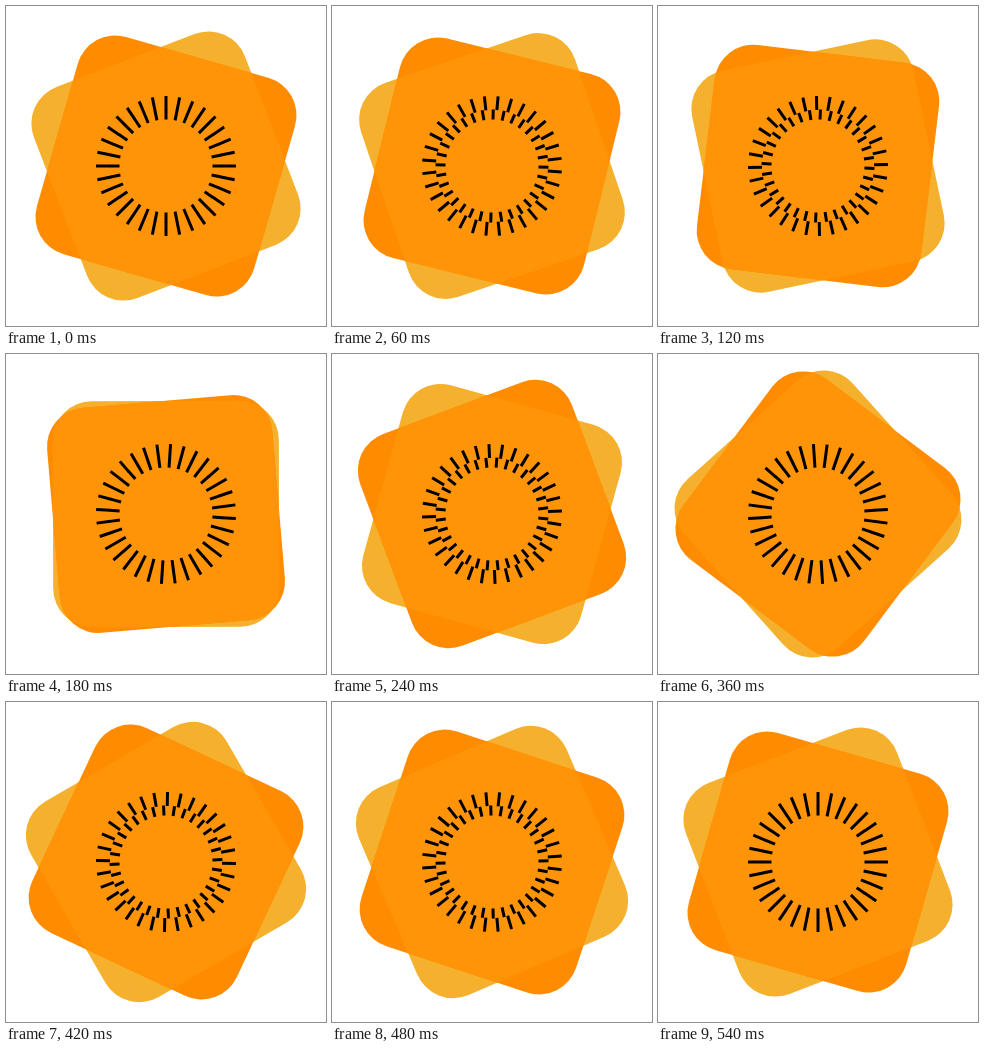
An HTML page with a canvas for the animation above (570 ms loop, 320 by 320 pixels).

```html
<!DOCTYPE html>
<html lang="en">
<head>
<meta charset="utf-8">
<title>Spinning badge</title>
<style>
  html, body { margin: 0; width: 100%; height: 100%; overflow: hidden; background: #fff; }
  canvas { display: block; width: 100vmin; height: 100vmin; }
</style>
</head>
<body>
<canvas id="stage" width="320" height="320"></canvas>
<script>
const ctx = document.getElementById('stage').getContext('2d');
const CENTER = 160, STEP = 30, STEPS = 19;
const HALF = 113, CORNER = 39;
const TICKS = 32;
const radians = degrees => degrees * Math.PI / 180;

// Symmetric cubic ease with control points (.42, 0) and (.58, 1).
function easeInOut(x) {
  let low = 0, high = 1;
  for (let i = 0; i < 30; i++) {
    const s = (low + high) / 2;
    if (1.26 * s - 0.78 * s * s + 0.52 * s ** 3 < x) low = s;
    else high = s;
  }
  return low * low * (3 - 2 * low);
}

function roundedSquare(degrees) {
  const square = new Path2D(), path = new Path2D();
  square.roundRect(-HALF, -HALF, 2 * HALF, 2 * HALF, CORNER);
  path.addPath(square, new DOMMatrix().translate(CENTER, CENTER).rotate(degrees));
  return path;
}

function drawRing(inner, outer, degrees) {
  ctx.beginPath();
  for (let i = 0; i < TICKS; i++) {
    const angle = radians(degrees + i * 360 / TICKS);
    const x = Math.cos(angle), y = Math.sin(angle);
    ctx.moveTo(CENTER + inner * x, CENTER + inner * y);
    ctx.lineTo(CENTER + outer * x, CENTER + outer * y);
  }
  ctx.stroke();
}

function draw(progress) {
  const turn = 90 * easeInOut(progress);
  const back = roundedSquare(-21 + turn);
  const front = roundedSquare(16 - turn);

  ctx.fillStyle = '#fff';
  ctx.fillRect(0, 0, 320, 320);
  ctx.fillStyle = '#f5b02e';
  ctx.fill(back);
  ctx.fillStyle = '#ff8c00';
  ctx.fill(front);

  // The overlap is slightly lighter than the front square alone.
  ctx.save();
  ctx.clip(back);
  ctx.fillStyle = '#ff9408';
  ctx.fill(front);
  ctx.restore();

  ctx.strokeStyle = '#000';
  ctx.lineWidth = 3;
  drawRing(56, 70, 45 * progress);
  drawRing(46.5, 56.5, -90 * progress);
}

function tick(now) {
  const step = Math.floor(now / STEP) % STEPS;
  draw(step / (STEPS - 1));
  requestAnimationFrame(tick);
}

tick(performance.now());
</script>
</body>
</html>
```
